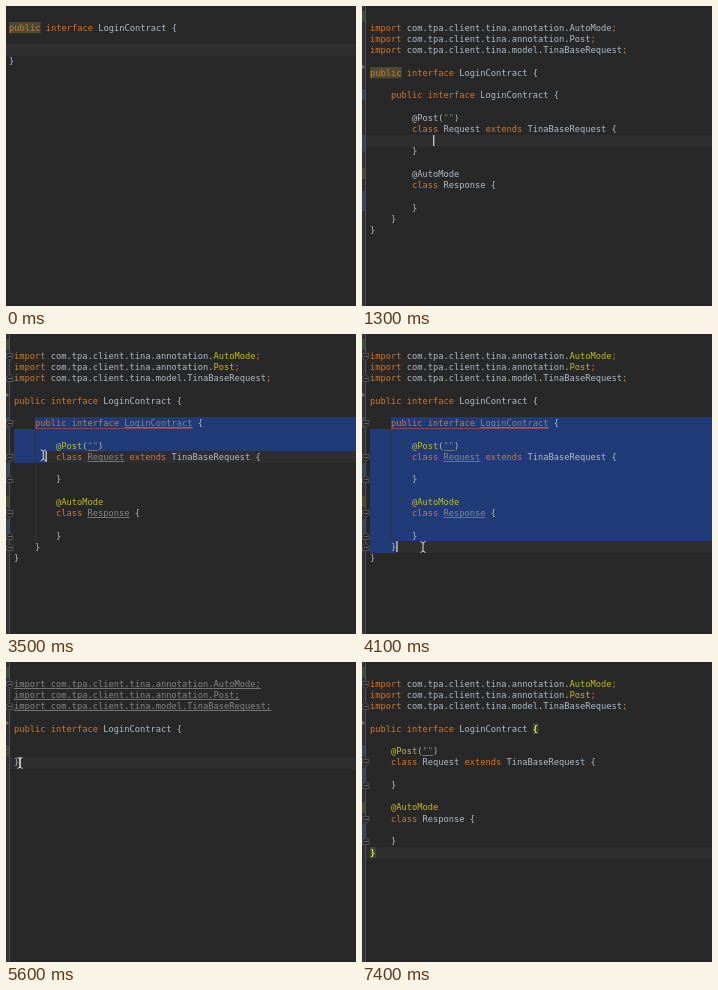
Animation, 350 px wide and 300 px high, one loop 7500 ms. Source, as an HTML page with a canvas:

```html
<!DOCTYPE html>
<html lang="en">
<head>
<meta charset="utf-8">
<title>Code editor</title>
<style>
html, body { margin: 0; width: 350px; height: 300px; overflow: hidden; background: #282828; }
canvas { display: block; }
</style>
</head>
<body>
<canvas id="stage" width="350" height="300"></canvas>
<script>
const g = document.getElementById('stage').getContext('2d');
const LOOP = 7500, CW = 5.25, LH = 11.27, MID = 21.5;
const MONO = '8.72px "DejaVu Sans Mono", monospace';
const TEXT = '#b0bbc7', KEY = '#cc7832', NOTE = '#c0ba2b', DIM = '#858585';
const KEYWORDS = ['import', 'public', 'interface', 'class', 'extends'];

const contract = 'public interface LoginContract {';
const imports = ['annotation.AutoMode', 'annotation.Post', 'model.TinaBaseRequest']
  .map(name => `import com.tpa.client.tina.${name};`).concat('');
const members = ['@Post("")', 'class Request extends TinaBaseRequest {', '', '}', '',
  '@AutoMode', 'class Response {', '', '}'];
const indent = (list, n) => list.map(s => s && ' '.repeat(n) + s);
const nested = [contract, '', ...indent([contract, ''], 4), ...indent(members, 8), '    }', '}'];
const flat = [contract, '', ...indent(members, 4), '}'];

// time, x, y
const path = [[2500, 297, 290], [2900, 29, 89], [3300, 29, 89], [3900, 61, 213], [4400, 61, 213],
  [4800, 17, 110], [5300, 14, 101], [5700, 14, 101], [6300, 5, 66], [6800, 5, 66]];

function pointer(t) {
  const i = path.findIndex(p => p[0] > t);
  if (i < 1) return null;
  const [a, b] = [path[i - 1], path[i]];
  const u = (t - a[0]) / (b[0] - a[0]), e = u * u * (3 - 2 * u);
  return [a[1] + (b[1] - a[1]) * e, a[2] + (b[2] - a[2]) * e];
}

function stateAt(t) {
  const s = { left: t < 1100 ? 3 : 8, mouse: pointer(t) };
  s.resolved = (t >= 2000 && t < 4700) || t >= 7200;
  s.unused = t >= 4700 && t < 7100;
  s.nested = t >= 1100 && t < 4400;
  s.marked = t < 2000 || (t >= 4600 && t < 5300);
  if (t < 900) {
    s.typed = 'tina'.slice(0, Math.max(0, Math.floor((t - 100) / 100)));
    s.lines = [contract, '', '    ' + s.typed, '}'];
    s.caret = [2, 4 + s.typed.length];
    s.reset = t < 600 ? 100 : 500;
  } else if (t < 4400) {
    s.lines = t < 1100 ? nested : [...imports, ...nested];
    s.caret = [t < 1100 ? 6 : 10, 12];
    s.reset = 1000;
    if (t >= 3300) s.anchor = [6, 4];
  } else if (t < 6800) {
    s.lines = [...imports, contract, '', '', '}'];
    s.caret = [6, 4];
    s.reset = 4400;
    if (t >= 5300) s.anchor = [7, 1];
  } else {
    s.lines = [...imports, ...flat];
    s.caret = [15, 1];
    s.reset = 6800;
  }
  if (s.anchor) {
    const [x, y] = s.mouse;
    const row = Math.round((y - MID) / LH), col = Math.round((x - s.left) / CW);
    s.caret = [row, Math.max(0, Math.min(s.lines[row].length, col))];
    s.reset = t;
  }
  return s;
}

const mid = row => MID + row * LH;
const rowTop = row => Math.round(mid(row) - LH / 2);

function rect(x, y, w, h, color) {
  g.fillStyle = color;
  g.fillRect(x, y, w, h);
}

function selection(s) {
  const [a, b] = [s.anchor, s.caret].sort((p, q) => p[0] - q[0] || p[1] - q[1]);
  for (let r = a[0]; r <= b[0]; r++) {
    const x = s.left + (r === a[0] ? a[1] * CW : 0);
    const end = r === b[0] ? s.left + b[1] * CW : 350;
    rect(x, rowTop(r), end - x, rowTop(r + 1) - rowTop(r), '#203b78');
  }
}

function tokenColor(word, s, row, idle) {
  if (idle) return DIM;
  if (KEYWORDS.includes(word) || word === ';') return KEY;
  if (word === '""') return s.resolved ? '#778071' : '#6a8759';
  if (s.resolved && /^@?(AutoMode|Post)$/.test(word)) return NOTE;
  if (s.nested && s.resolved && (/^(Request|Response)$/.test(word) ||
    (row === 6 && word === 'LoginContract'))) return DIM;
  return TEXT;
}

function code(s) {
  g.font = MONO;
  s.lines.forEach((line, row) => {
    const y = mid(row), idle = s.unused && line.startsWith('import');
    for (const m of line.matchAll(/@\w+|""|\w+|;|[^\w\s@";]+/g)) {
      const x = s.left + m.index * CW, w = m[0].length * CW;
      const color = tokenColor(m[0], s, row, idle);
      g.fillStyle = color;
      g.fillText(m[0], x, y + 3);
      if (!idle && (color === DIM || (m[0] === '""' && s.resolved)))
        rect(x, Math.round(y + 4), w, 1, '#747474');
    }
    if (idle) rect(s.left, Math.round(y + 4), line.length * CW, 1, '#747474');
  });
  if (s.nested && s.resolved) {
    rect(s.left + 4 * CW, 94, 30 * CW, 1, '#8d4545');
    rect(s.left + 4 * CW, rowTop(7), 1, rowTop(17) - rowTop(7), '#353535');
  }
}

function gutter(s, t) {
  if (s.left === 3) return;
  rect(0, 0, 3, 300, '#2f3031');
  rect(3, 0, 1, 300, '#505050');
  rect(0, 5, 3, 11, '#394c35');
  if (s.lines.length > 10) {
    const shift = s.nested ? 2 : 0;
    rect(0, rowTop(6), 3, LH, '#31465a');
    rect(0, rowTop(8 + shift), 3, LH * 1.5, '#31465a');
    rect(0, rowTop(11 + shift), 3, LH, '#494634');
    rect(0, rowTop(13 + shift), 3, LH * 1.8, '#31465a');
  } else rect(0, rowTop(6), 3, LH, '#3c4632');
  g.fillStyle = '#777';
  g.beginPath();
  g.moveTo(0, 59); g.lineTo(3, 61); g.lineTo(0, 63);
  g.fill();
  if (t < 2500) return;
  s.lines.forEach((line, row) => {
    if (row !== 0 && row !== 2 && !/^ .*[{}]$/.test(line)) return;
    const y = Math.round(mid(row)) + .5, d = row === 2 || line.endsWith('}') ? -1 : 1;
    g.beginPath();
    g.moveTo(.5, y - 3 * d); g.lineTo(7, y - 3 * d); g.lineTo(7, y + d);
    g.lineTo(3.8, y + 4 * d); g.lineTo(.5, y + d); g.closePath();
    g.fillStyle = '#282828';
    g.fill();
    g.lineWidth = .8;
    g.strokeStyle = '#5c5c5c';
    g.stroke();
    rect(2, y - .5, 4, 1, '#666');
  });
}

function braces() {
  g.font = 'bold ' + MONO;
  for (const [char, row, col] of [['{', 4, 31], ['}', 15, 0]]) {
    const x = 8 + col * CW;
    rect(x, rowTop(row), CW + .5, LH, '#3a4640');
    g.fillStyle = '#f4e52c';
    g.fillText(char, x, mid(row) + 3);
  }
}

function completion() {
  rect(20, 51, 330, 37, '#3b3e40');
  rect(20, 51, 330, 12, '#2a4474');
  g.font = MONO;
  g.fillStyle = TEXT;
  g.fillText('tina', 24, 60);
  g.fillText('tina contract template', 130, 60);
}

function tooltip() {
  g.beginPath();
  g.moveTo(-1, 100.5); g.lineTo(34, 100.5); g.lineTo(40, 95); g.lineTo(46, 100.5);
  g.lineTo(114, 100.5); g.quadraticCurveTo(117, 100.5, 117, 103); g.lineTo(117, 116);
  g.quadraticCurveTo(117, 119, 114, 119); g.lineTo(-1, 119); g.closePath();
  g.fillStyle = '#494b4c';
  g.fill();
  g.lineWidth = 1;
  g.strokeStyle = '#656768';
  g.stroke();
  g.font = '9.3px "DejaVu Sans", sans-serif';
  g.fillStyle = '#c0c0c0';
  g.textAlign = 'right';
  g.fillText("Duplicate class: 'LoginContract'", 113, 113);
  g.textAlign = 'left';
}

function cursor([x, y]) {
  g.beginPath();
  if (x < 8) {
    const tip = [[0, 0], [0, 11], [2.6, 8.7], [4.3, 12.2], [6, 11.4], [4.4, 8], [7.6, 8]];
    tip.forEach(([dx, dy]) => g.lineTo(x + dx, y - 1 + dy));
    g.closePath();
    g.fillStyle = '#111';
    g.fill();
    g.strokeStyle = '#eee';
  } else {
    g.moveTo(x - 2.5, y - 5.5); g.lineTo(x, y - 4); g.lineTo(x + 2.5, y - 5.5);
    g.moveTo(x, y - 4); g.lineTo(x, y + 4);
    g.moveTo(x - 2.5, y + 5.5); g.lineTo(x, y + 4); g.lineTo(x + 2.5, y + 5.5);
    g.strokeStyle = '#ddd';
  }
  g.lineWidth = 1;
  g.stroke();
}

function draw(t) {
  const s = stateAt(t), [row, col] = s.caret;
  rect(0, 0, 350, 300, '#282828');
  rect(s.left === 3 ? 0 : 4, rowTop(row), 350, 12, '#2e2e2e');
  if (s.marked) rect(s.left, rowTop(s.left === 3 ? 0 : 4), 6 * CW, LH, '#4d4a34');
  if (s.anchor) selection(s);
  gutter(s, t);
  code(s);
  if (t >= 7300) braces();
  if (Math.floor((t - s.reset) / 600) % 2 === 0)
    rect(s.left + col * CW, rowTop(row), 1.4, 11, '#c4c4c4');
  if (s.typed) completion();
  if (t >= 2900 && t < 3300) tooltip();
  if (s.mouse) cursor(s.mouse);
}

const start = performance.now();
function tick() {
  const t = (performance.now() - start) % LOOP;
  draw(Math.floor(t / 100) * 100);
  requestAnimationFrame(tick);
}
tick();
</script>
</body>
</html>
```
